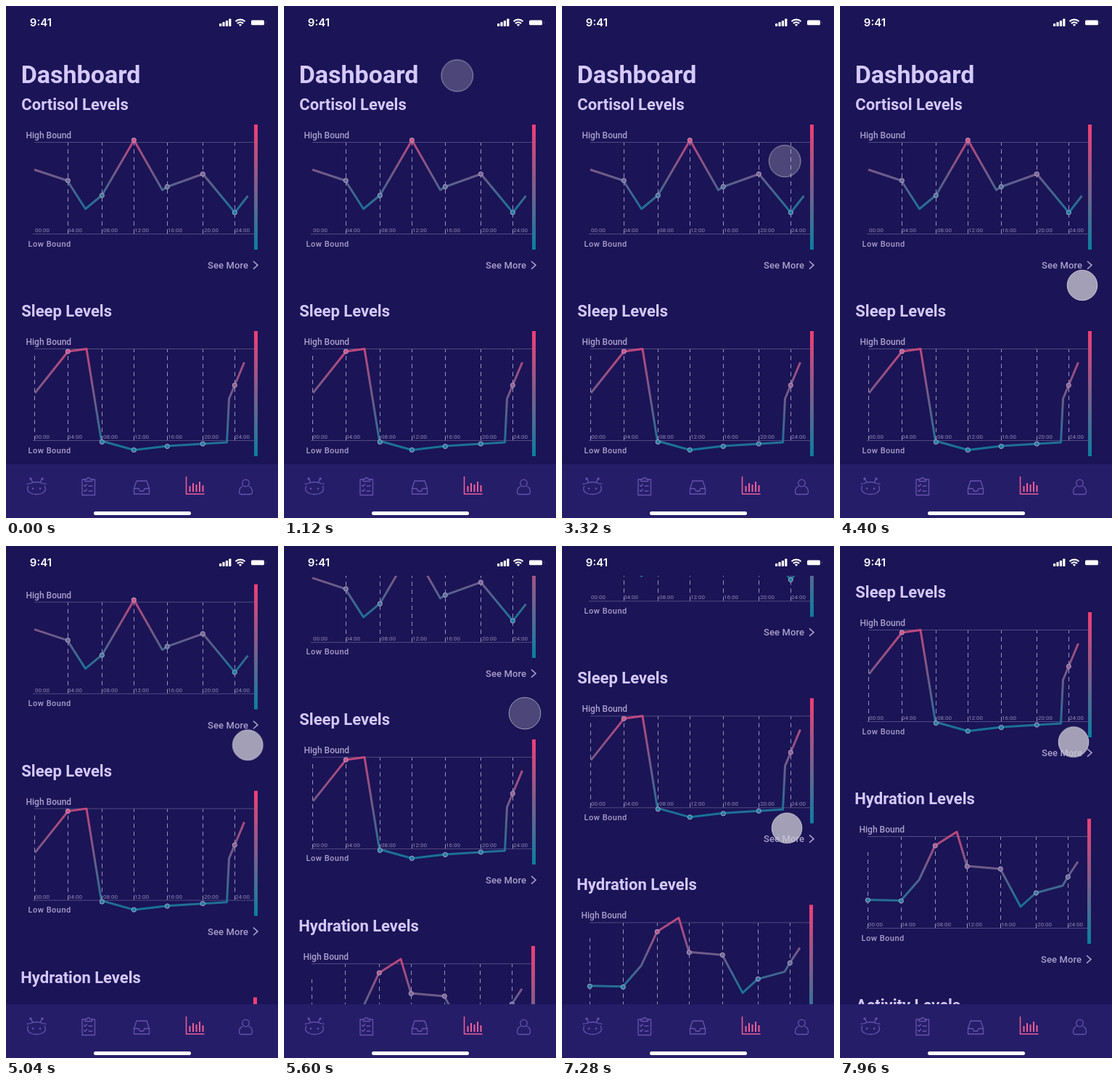
An HTML page for the animation above (8000 ms loop, 375 px wide and 704 px high).

```html
<!DOCTYPE html>
<html lang="en">
<head>
<meta charset="utf-8">
<title>Dashboard</title>
<style>
html, body { margin: 0; width: 100%; height: 100%; overflow: hidden; background: #1b1456; }
svg { display: block; width: 100vw; height: 100vh; font-family: Roboto, sans-serif; }
.title { font-weight: 700; font-size: 22px; fill: #d5c9ff; }
.large { font-size: 34px; }
.label { font-weight: 500; font-size: 12px; fill: #aaa1cc; }
.low { font-size: 11px; letter-spacing: .5px; }
.more { font-size: 13px; letter-spacing: .1px; }
.tick { font-size: 8px; fill: #8f88b5; }
.rule { stroke: #514b82; }
.dash { stroke: #a9a3c6; stroke-dasharray: 6 5; stroke-width: .9; }
.series { fill: none; stroke-width: 3; stroke-linejoin: round; opacity: .85; }
.dot { stroke: #aaa1cc; }
.icon { fill: none; stroke: #6553ad; stroke-width: 1.3; stroke-linecap: round; stroke-linejoin: round; }
.cursor circle { fill: #cdcad4; stroke: #d8d6de; }

#scroll { animation: scroll 8s linear infinite; }
#cursor { animation: move 8s ease-in-out infinite; }
#hover { animation: hover 8s step-end infinite; }
#press { animation: press 8s step-end infinite; }

@keyframes scroll {
  0%, 57% { transform: translateY(0); animation-timing-function: cubic-bezier(.4, 0, .7, .9); }
  65.5% { transform: translateY(-155px); animation-timing-function: linear; }
  70% { transform: translateY(-181px); animation-timing-function: cubic-bezier(.3, .36, .65, .74); }
  77% { transform: translateY(-212px); animation-timing-function: cubic-bezier(.3, .52, .65, 1); }
  87%, 90% { transform: translateY(-231px); animation-timing-function: ease-in; }
  91% { transform: translateY(-237.5px); animation-timing-function: cubic-bezier(.35, .3, .65, .8); }
  99.5%, 100% { transform: translateY(-356px); }
}
@keyframes move {
  0%, 9.5% { transform: translate(338px, -30px); animation-timing-function: linear; }
  10% { transform: translate(325px, 6px); animation-timing-function: ease-out; }
  14.5%, 19.5% { transform: translate(237px, 97.5px); animation-timing-function: ease-in; }
  23.75% { transform: translate(277.5px, 114px); animation-timing-function: ease-out; }
  27.5%, 29.5% { transform: translate(266px, 138px); }
  33%, 37.5% { transform: translate(273.5px, 142.5px); animation-timing-function: ease-in; }
  43.5% { transform: translate(339px, 280px); animation-timing-function: ease-out; }
  48% { transform: translate(335px, 384.5px); }
  49%, 57% { transform: translate(334px, 384px); animation-timing-function: cubic-bezier(.4, 0, .7, .9); }
  65.5% { transform: translate(333px, 229px); }
  70% { transform: translate(332px, 230px); }
  77% { transform: translate(332px, 245px); }
  86%, 90% { transform: translate(310px, 394.5px); animation-timing-function: ease-in; }
  91% { transform: translate(310px, 388px); animation-timing-function: cubic-bezier(.35, .3, .65, .8); }
  99.5%, 100% { transform: translate(322px, 269.5px); }
}
@keyframes hover {
  0%, 65.5% { opacity: 1; }
  55% { opacity: 0; }
  87%, 100% { opacity: 0; }
}
@keyframes press {
  0%, 65.5% { opacity: 0; }
  55% { opacity: 1; }
  87%, 100% { opacity: 1; }
}
</style>
</head>
<body>
<svg viewBox="0 0 375 704">
  <defs>
    <clipPath id="view"><rect y="41" width="375" height="589"/></clipPath>
  </defs>
  <rect width="375" height="704" fill="#1b1456"/>

  <g clip-path="url(#view)">
    <g id="scroll">
      <text x="20.7" y="106" class="title large">Dashboard</text>
      <g id="charts"></g>
    </g>
  </g>

  <g fill="#fff">
    <text x="32.8" y="27.5" style="font:600 15px Inter, sans-serif">9:41</text>
    <rect x="294" y="24" width="3.2" height="4" rx=".8"/>
    <rect x="298.4" y="22" width="3.2" height="6" rx=".8"/>
    <rect x="302.8" y="20" width="3.2" height="8" rx=".8"/>
    <rect x="307.2" y="17.5" width="3.2" height="10.5" rx=".8"/>
    <g fill="none" stroke="#fff" stroke-width="2.1">
      <path d="M316.5 21.2a9.4 9.4 0 0 1 13 0M318.9 24a6 6 0 0 1 8.2 0"/>
    </g>
    <path d="M320.9 25.8a3 3 0 0 1 4.2 0L323 28z"/>
    <rect x="338" y="19.5" width="18" height="6.8" rx="1.6"/>
    <path d="M358 21.2q1.5 1.5 0 3z" opacity=".5"/>
  </g>

  <rect y="630" width="375" height="74" fill="#261d69"/>
  <g class="icon">
    <path d="M32 657q10-5 20 0M30.500 660q-3 8 5 10.500 6.500 2 13 0 8-2.500 5-10.500M30.500 656.500l-1.500 1M53.500 656.500l1.500 1M36.500 654.500l-2-4M47.500 654.500l2-4"/>
    <g fill="#6553ad" stroke="none">
      <circle cx="34" cy="650" r="1.700"/><circle cx="50" cy="650" r="1.700"/>
      <circle cx="37" cy="663.500" r="1.300"/><circle cx="47" cy="663.500" r="1.300"/>
    </g>
    <path d="M109 651h-4v21.500h17.500V651h-4M109 653.500v-3h2.500q2.200-4 4.500 0h2.500v3z"/>
    <path d="M107.500 659l1.500 1.500 2.500-3M107.500 666l1.500 1.500 2.500-3M114 660h5M114 667h5"/>
    <path d="M176.500 663.500l3.500-10.500h14l3.500 10.500v7.500h-21zH183l1.500 3.500h5l1.500-3.500h6.500"/>
    <circle cx="330.500" cy="656" r="4.800"/>
    <path d="M326 660.500q-4.500 2-4.500 7.500 0 3.500 3 3.500h12q3 0 3-3.500 0-5.500-4.500-7.500"/>
    <path stroke="#ee5f95" stroke-width="1.500" d="M248.500 647.500v23.500h24.500"/>
    <path stroke="#ee5f95" stroke-width="2" stroke-linecap="butt" d="M253.500 668v-8M258 668v-12M262.500 668v-10M267 668v-14M271.500 668v-9"/>
  </g>
  <rect x="121" y="695" width="134" height="5" rx="2.5" fill="#fff"/>

  <g id="cursor" class="cursor">
    <g id="hover"><circle r="21.800" fill-opacity=".28" stroke-opacity=".65"/></g>
    <g id="press"><circle r="20.800" fill-opacity=".77" stroke-opacity=".85"/></g>
  </g>
</svg>

<script>
const PITCH = 284;
const columns = [39.5, 85.5, 132.5, 176.5, 222.5, 271.5, 315.5];
const tickX = [40, 85, 134, 177, 223, 273, 316];

// first: top of the leftmost dashed line, if there is one
const charts = [
  { name: 'Cortisol', dx: 0, top: 184, bottom: 284,
    line: '39,225 84.5,240 109.5,279 132.5,260 176.5,184.5 215.5,253 222.5,248.5 271.5,231 315.5,284 333.5,261',
    dots: [null, 240, 260.5, 184.5, 248.5, 231, 284] },
  { name: 'Sleep', dx: 0, top: 187, bottom: 326, first: 192,
    line: '40,248 85.5,191 111,187.5 131.5,314 176.5,326.5 222.5,321 271.5,318 304.5,316 307.5,256 328.5,206',
    dots: [null, 191, 315.5, 326.5, 321.5, 318, 237.5] },
  { name: 'Hydration', dx: -1, top: 181, bottom: 284, first: 209,
    line: '39,274.5 85,275.5 110,247 132,200 162,181 176,228 222,232 250,284 271,265 308,255 315,243 329,222',
    dots: [275, 276, 200, 228.5, 232, 265, 243] }
];

const gradient = (id, y1, y2, from, to) => `
  <linearGradient id="${id}" gradientUnits="userSpaceOnUse" x1="0" x2="0" y1="${y1}" y2="${y2}">
    <stop stop-color="${from}"/><stop offset="1" stop-color="${to}"/>
  </linearGradient>`;

const text = (cls, x, y, str) => `<text class="${cls}" x="${x}" y="${y}">${str}</text>`;

const column = (x, top) => `<path class="dash" d="M${x} 313V${top}"/>`;

function chart(c, i) {
  const paint = `url(#tone${i})`;
  const dashes = columns.map((x, k) =>
    k ? column(x, 188) : c.first ? column(x, c.first) : '').join('');
  const ticks = tickX.map((x, k) =>
    text('tick', x, 311, String(k * 4).padStart(2, '0') + ':00')).join('');
  const dots = c.dots.map((y, k) => y === null ? '' :
    `<circle class="dot" cx="${columns[k] - .2}" cy="${y}" r="3.1" fill="${paint}"/>`).join('');
  return `<g transform="translate(${c.dx} ${i * PITCH})">
    ${gradient('tone' + i, c.top, c.bottom, '#dd4f82', '#1483a2')}
    ${text('title', 21.3, 143, c.name + ' Levels')}
    ${text('label', 27.5, 182, 'High Bound')}
    ${text('label low', 30.5, 330.5, 'Low Bound')}
    <path class="rule" d="M39 187.5H342M37 313.5H342"/>
    <polyline class="series" stroke="${paint}" points="${c.line}"/>
    ${dashes}${ticks}${dots}
    <rect x="342" y="163" width="5" height="172" fill="url(#bar)"/>
    ${text('label more', 278, 361, 'See More')}
    <path d="M341 351l6 5.3-6 5.3" fill="none" stroke="#aaa1cc" stroke-width="1.6"/>
  </g>`;
}

document.getElementById('charts').innerHTML =
  gradient('bar', 163, 335, '#f03f76', '#0a7f9f') + charts.map(chart).join('') +
  text('title', 22, 143 + 3 * PITCH, 'Activity Levels');
</script>
</body>
</html>
```
